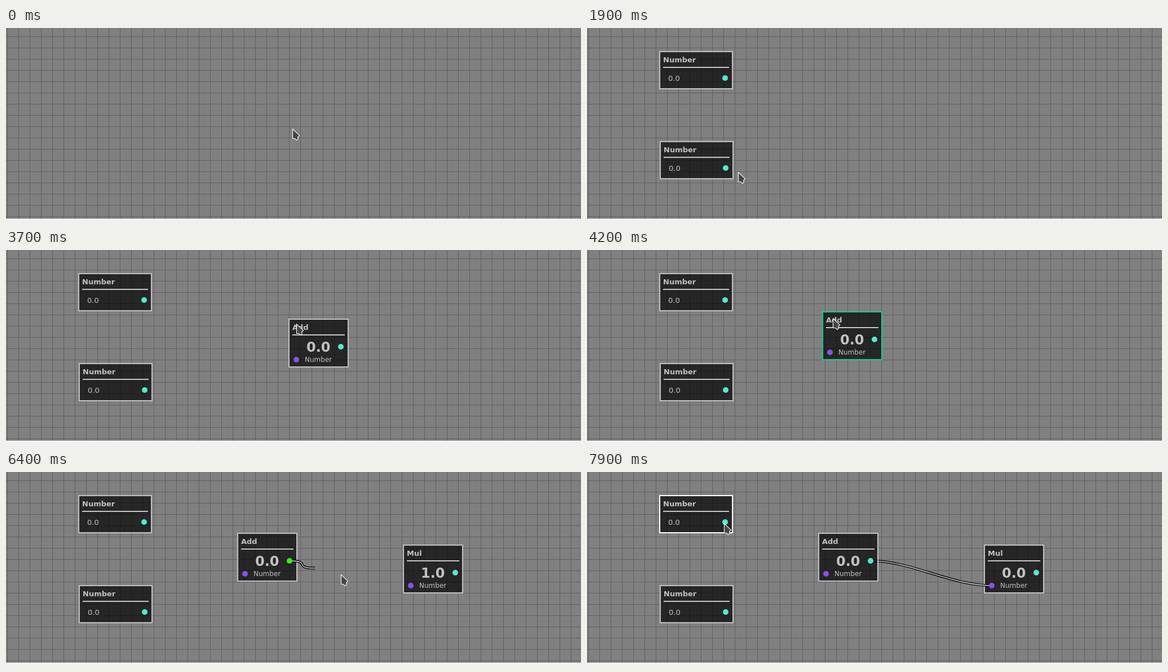
Recreate the animation shown at these times as an HTML page. Size 1020x345 px, loop 8000 ms.

```html
<!DOCTYPE html>
<html lang="en">
<head>
<meta charset="utf-8">
<title>Node editor</title>
<style>
  html, body { margin: 0; width: 100%; height: 100%; overflow: hidden; background: #808080; }
  svg { display: block; width: 1020px; height: 345px; font-family: "DejaVu Sans", sans-serif; }
  text { fill: #c2c2c2; font-size: 13px; white-space: pre; }
  .title { font-weight: bold; }
  .value { font-weight: bold; font-size: 24px; }
  .label { font-size: 12px; }
  .frame { fill: #000; fill-opacity: .7; stroke-width: 2; }
  .rule { fill: #c6c6c6; }
  .wire path { fill: none; }
</style>
</head>
<body>
<svg viewBox="0 0 1020 345">
  <defs>
    <pattern id="grid" x="2" y="15" width="20" height="20" patternUnits="userSpaceOnUse">
      <path d="M0 0H20V1H1V20H0Z" fill="#606060"/>
    </pattern>
  </defs>
  <rect width="1020" height="345" fill="#808080"/>
  <rect width="1020" height="339" fill="url(#grid)"/>
  <rect y="339" width="1020" height="6" fill="#f2f0f1"/>
  <g id="nodes"></g>
  <g id="wire" class="wire">
    <path stroke="#000" stroke-width="4.6"/>
    <path stroke="#c8c8c8" stroke-width="1.6"/>
  </g>
  <g id="dots"></g>
  <path id="cursor" d="M.5 .8V17.5H4.5L7.5 20.3 10.2 18.8 9.6 15 12.6 12.2Z" fill="#464646" stroke="#fff" stroke-width="1.1"/>
</svg>
<script>
const STEP = 100, LOOP = 8000;
const GRAY = '#c2c2c2', WHITE = '#fff', DRAG = '#0fd28a';
const TEAL = '#4eecd0', PURPLE = '#8a4ff5', ACTIVE = '#35f50a';
const byId = id => document.getElementById(id);
const between = (t, from, to) => t >= from && t < to;
const clamp = (v, low, high) => Math.min(Math.max(v, low), high);
const shown = on => on ? 'visible' : 'hidden';

const easeOut = u => 1 - (1 - u) ** 2;
const easeLate = u => 1 - (1 - u * u) ** 5;

function set(el, attrs) {
  for (const key in attrs) el.setAttribute(key, attrs[key]);
}
function add(parent, tag, attrs, text = '') {
  const el = document.createElementNS('http://www.w3.org/2000/svg', tag);
  set(el, attrs);
  el.textContent = text;
  parent.append(el);
  return el;
}

// Pointer gestures: each is an eased quadratic curve; it rests at the end.
const gesture = (start, end, from, to, via = from.map((v, i) => (v + to[i]) / 2), ease = easeOut) =>
  ({ start, end, from, via, to, ease });
const gestures = [
  gesture(100, 700, [508, 179], [127, 40]),
  gesture(1060, 1500, [127, 40], [128, 200], [153, 120]),
  gesture(1800, 2100, [128, 200], [380, 300]),
  gesture(2800, 3300, [496, 217], [501, 121], [546, 165]),
  gesture(3600, 3800, [501, 121], [520, 134]),
  gesture(3800, 4350, [520, 134], [429, 120]),
  gesture(4900, 5300, [429, 120], [704, 129], [540, 331]),
  gesture(5500, 6000, [704, 129], [502, 158]),
  gesture(6100, 7000, [502, 158], [712, 205], [604, 188], easeLate),
  gesture(7100, 7900, [712, 205], [243, 91], [560, 270])
];

function cursorAt(t) {
  const { start, end, from, via, to, ease } = gestures.findLast(g => g.start <= t) || gestures[0];
  const s = ease(clamp((t - start) / (end - start), 0, 1));
  return from.map((a, i) =>
    Math.round(a * (1 - s) ** 2 + 2 * via[i] * s * (1 - s) + to[i] * s * s));
}

const isMoving = t => between(t, 3900, 4400);
const isLinking = t => between(t, 6200, 7200);
const isLinked = t => t >= 7200;

function makeNode({ title, value, operator, born, at, outline }) {
  const w = operator ? 107 : 131, h = operator ? 87 : 68;
  const body = add(byId('nodes'), 'g', {});
  const ports = add(byId('dots'), 'g', {});
  const frame = add(body, 'rect', { class: 'frame', x: 1, y: 1, width: w - 2, height: h - 2 });
  add(body, 'rect', { class: 'rule', x: 7, y: 28, width: w - 14, height: 2 });
  add(body, 'text', { class: 'title', x: 7, y: 20 }, title);
  const number = add(body, 'text', operator
    ? { class: 'value', x: 32, y: 59 }
    : { x: 16, y: 53 }, value);
  if (operator) {
    add(body, 'text', { class: 'label', x: 29, y: 77 }, 'Number');
    add(ports, 'circle', { cx: 14, cy: 73, r: 5, fill: PURPLE });
  }
  const output = add(ports, 'circle', { cx: w - 14, cy: operator ? 50 : 48, r: 5, fill: TEAL });

  // Hover reacts one step after the pointer.
  function hoverColor(t, x, y) {
    const [cx, cy] = cursorAt(t - STEP);
    return between(cx, x + 1, x + w) && between(cy, y + 1, y + h) ? WHITE : GRAY;
  }
  function update(t) {
    const [x, y] = at(t);
    const attrs = { transform: `translate(${x} ${y})`, visibility: shown(t >= born) };
    set(body, attrs);
    set(ports, attrs);
    set(frame, { stroke: outline?.(t) || hoverColor(t, x, y) });
  }
  return { body, update, number, output };
}

function sumPosition(t) {
  const [x, y] = cursorAt(clamp(t, 3800, 4400));
  return [x - 19, y - 12];
}

const first = makeNode({ title: 'Number', value: '0.0', born: 1100, at: () => [128, 41] });
const second = makeNode({ title: 'Number', value: '0.0', born: 1900, at: () => [129, 201] });
const product = makeNode({
  title: 'Mul', value: '1.0', operator: true, born: 5600, at: () => [704, 129],
  outline: t => isLinking(t) && GRAY
});
const sum = makeNode({
  title: 'Add', value: '0.0', operator: true, born: 3700, at: sumPosition,
  outline: t => isMoving(t) && DRAG
});
const nodes = [first, second, product, sum];

function drawWire(t) {
  const wire = byId('wire');
  const [x, y] = isLinked(t) ? [718, 202] : cursorAt(t - STEP);
  const bend = Math.max((x - 503) / 3, 40);
  const d = `M503 158C${503 + bend} 158 ${x - bend} ${y} ${x} ${y}`;
  set(wire, { visibility: shown(t >= 6300) });
  for (const path of wire.children) set(path, { d });
  // A loose wire floats on top; a joined one tucks under its source node.
  if (isLinked(t)) sum.body.before(wire);
  else byId('nodes').append(wire);
}

function render(t) {
  nodes.forEach(node => node.update(t));
  product.number.textContent = isLinked(t) ? '0.0' : '1.0';
  set(sum.output, { fill: isLinking(t) ? ACTIVE : TEAL });
  drawWire(t);
  set(byId('cursor'), {
    visibility: shown(!between(t, 2100, 2800)),
    transform: `translate(${cursorAt(t)})`
  });
}

function tick() {
  render(Math.floor(performance.now() % LOOP / STEP) * STEP);
  requestAnimationFrame(tick);
}
tick();
</script>
</body>
</html>
```
